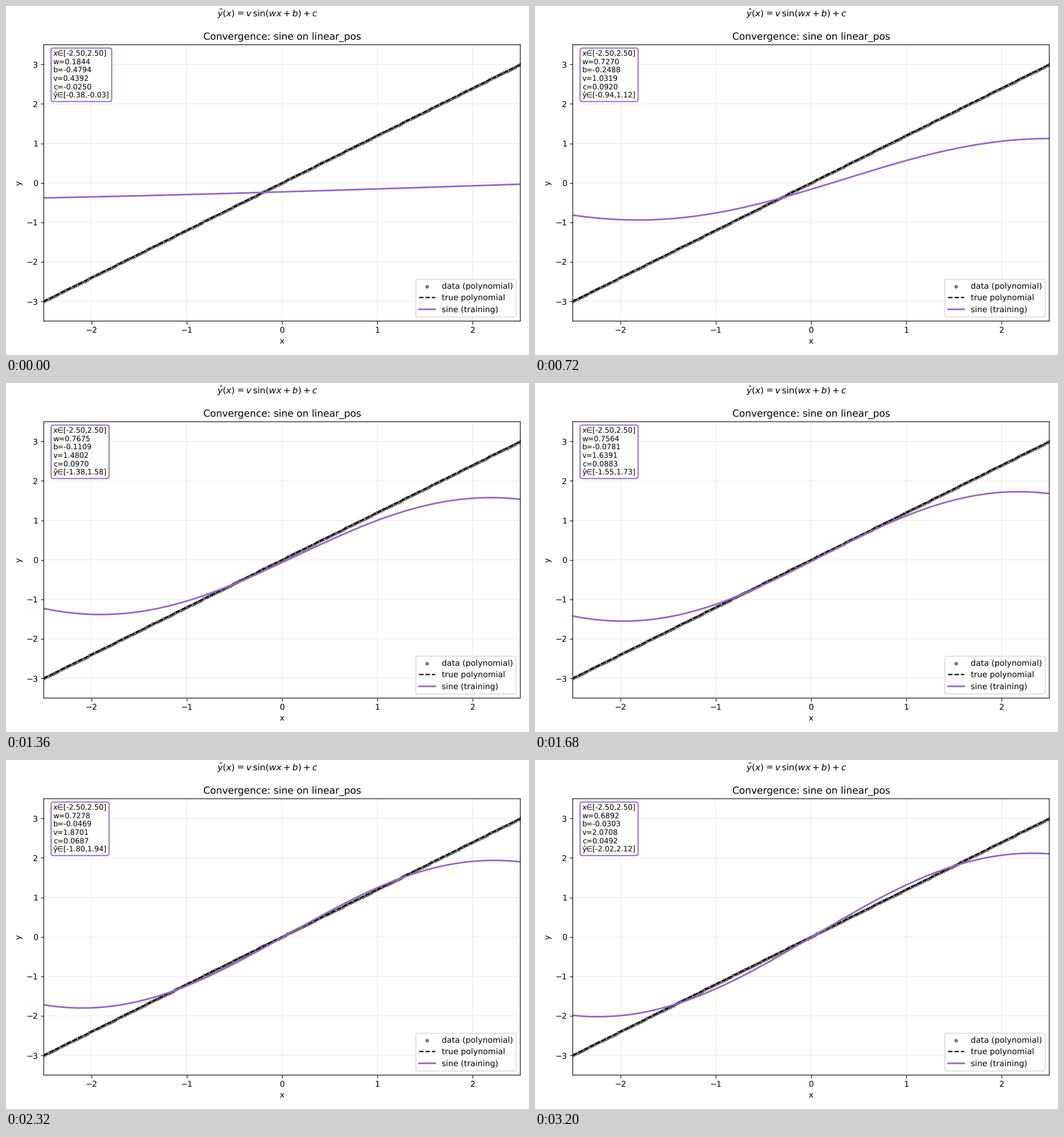
A matplotlib script for the animation above (3.28 s loop, 917 by 611 pixels).

```python
import numpy as np
import matplotlib.pyplot as plt
from matplotlib.animation import FuncAnimation

W, H, DPI = 917, 611, 101.875
FRAMES, INTERVAL = 41, 80
STEPS_PER_FRAME, RATE = 5, 0.01
START = (0.1844, -0.4794, 0.4392, -0.0250)  # w, b, v, c
PURPLE = "tab:purple"

plt.rcParams.update({
    "font.family": "DejaVu Sans",
    "text.hinting": "none",
    "path.snap": False,
})

x_data = np.linspace(-2.5, 2.5, 200)
y_data = 1.2 * x_data
x_line = np.linspace(-2.5, 2.5, 400)


def model(x, p):
    w, b, v, c = p
    return v * np.sin(w * x + b) + c


def gradient(p):
    """Gradient of the mean squared error."""
    w, b, v, _ = p
    err = 2 * (model(x_data, p) - y_data)
    slope = err * v * np.cos(w * x_data + b)
    return np.array([(slope * x_data).mean(), slope.mean(),
                     (err * np.sin(w * x_data + b)).mean(), err.mean()])


def train():
    """Parameters at every frame of the gradient descent."""
    p = np.array(START)
    path = [p]
    for _ in range(FRAMES - 1):
        for _ in range(STEPS_PER_FRAME):
            p = p - RATE * gradient(p)
        path.append(p)
    return path


path = train()

fig = plt.figure(figsize=((W + 1e-6) / DPI, (H + 1e-6) / DPI), dpi=DPI,
                 facecolor="white")
left, right, top, bottom = 66.2, 901.7, 67.8, 551.6
ax = fig.add_axes([left / W, 1 - bottom / H,
                   (right - left) / W, (bottom - top) / H])
fig.suptitle(r"$\hat{y}(x) = v\,\sin(wx+b)+c$", fontsize=11, y=0.996)
ax.set_title("Convergence: sine on linear_pos")
ax.set(xlim=(-2.5, 2.5), ylim=(-3.5, 3.5), xlabel="x", ylabel="y",
       xticks=range(-2, 3), yticks=range(-3, 4))
ax.grid(alpha=0.25)

ax.scatter(x_data, y_data, s=12, color="black", alpha=0.45,
           label="data (polynomial)")
ax.plot(x_line, 1.2 * x_line, "--", color="black", lw=1.5,
        label="true polynomial")
curve, = ax.plot([], [], color=PURPLE, lw=2, label="sine (training)")
ax.legend(loc="lower right")

info = ax.text(0.02, 0.98, "", transform=ax.transAxes, fontsize=9,
               va="top", ha="left",
               bbox=dict(boxstyle="round,pad=0.3", facecolor="white",
                         edgecolor=PURPLE, lw=1.5, alpha=0.9))


def update(i):
    p = path[i]
    y = model(x_line, p)
    curve.set_data(x_line, y)
    rows = ["x∈[-2.50,2.50]"]
    rows += [f"{name}={value:.4f}" for name, value in zip("wbvc", p)]
    rows.append(f"ŷ∈[{y.min():.2f},{y.max():.2f}]")
    info.set_text("\n".join(rows))
    return curve, info


anim = FuncAnimation(fig, update, frames=FRAMES, interval=INTERVAL,
                     init_func=lambda: update(0), repeat=True,
                     repeat_delay=0, blit=False)
plt.show()
```
